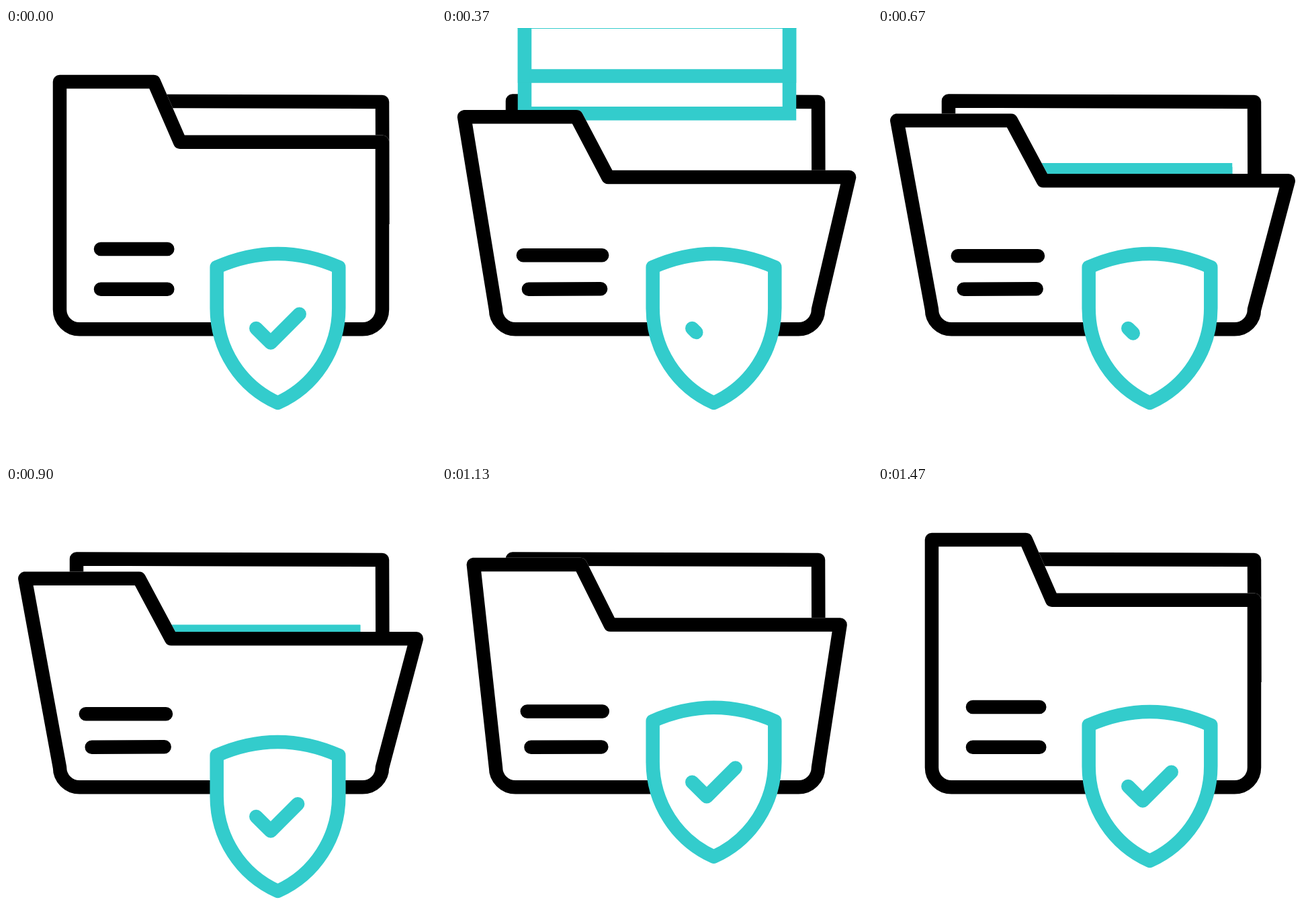
Recreate the animation shown at these times as an HTML page. Size 640 by 640 pixels, loop 1.67 s.

```html
<!DOCTYPE html>
<html lang="en">
<head>
<meta charset="utf-8">
<title>Secure folder</title>
<style>
  html, body { margin: 0; width: 100%; height: 100%; overflow: hidden; background: #fff; }
  svg { display: block; width: 100vw; height: 100vh; }
  path { fill: none; stroke: #000; stroke-width: 20.5; stroke-linejoin: round; }
  .cap { stroke-linecap: round; }
  .teal { stroke: #33cccc; }
  .paper { fill: #fff; }
  .sheet { stroke-linejoin: miter; }
  .mask { fill: #fff; stroke: #fff; }
</style>
</head>
<body>
<svg viewBox="0 0 640 640">
  <path d="M105 200V108.5L560 110L560.6 292"/>
  <path class="sheet teal paper" d="M123 217H517V422H123Z"/>
  <path class="sheet teal paper" d="M123 217H517V422H123Z"/>
  <path class="sheet teal paper" d="M123 217H517V422H123Z"/>
  <path id="mask" class="mask"/>
  <path id="front"/>
  <path id="lines" class="cap"/>
  <g id="shield">
    <path class="teal paper" d="M313.7 356Q404.5 316 495.3 356V417C495.3 478 460 533 404.5 558C349 533 313.7 478 313.7 417Z"/>
    <path id="check" class="teal cap" pathLength="1" d="M372.3 447L394 468.5L436.7 425.7"/>
  </g>
</svg>
<script>
const LOOP = 1670, TICK = 100 / 3;
const $ = id => document.getElementById(id);
const sheets = [...document.querySelectorAll('.sheet')];

const span = (t, a, b) => Math.min(1, Math.max(0, (t - a) / (b - a)));
const smooth = s => s * s * (3 - 2 * s);
const mix = (a, b, k) => a + (b - a) * k;

// Same as cubic-bezier(.167, 0, .667, 1)
function swift(x) {
  let lo = 0, hi = 1;
  for (let i = 0; i < 24; i++) {
    const s = (lo + hi) / 2, r = 1 - s;
    if (0.5 * r * r * s + 2 * r * s * s + s ** 3 < x) lo = s; else hi = s;
  }
  return smooth(lo);
}

// Sheets fall one after another; each lands at its own tick
const FALL = 12.5, DROP = 490, landings = [18.1, 19.1, 20.8];

function shieldY(t) {
  if (t < 30.7) return 51.5 * smooth(span(t, 20, 29));
  if (t < 35.2) return mix(51.5, -18.5, smooth(span(t, 30.7, 35.2)));
  return -18.5 * (1 - smooth(span(t, 35.2, 44)));
}

function draw(t) {
  const k = swift(span(t, 0, 13.8)) - swift(span(t, 29.2, 43.6));
  const p = (x0, y0, x1, y1) => mix(x0, x1, k).toFixed(2) + ' ' + mix(y0, y1, k).toFixed(2);

  const front = `M${p(80, 80, 28.3, 137.7)}L${p(220, 80, 198, 137.7)}` +
    `L${p(259, 169.7, 246, 227.3)}L${p(560, 169.7, 610.8, 227.3)}` +
    'L560 419A29.3 29.3 0 0 1 530.7 448.3H109.3A29.3 29.3 0 0 1 80 419Z';
  $('mask').setAttribute('d', front);
  $('front').setAttribute('d', front);
  $('lines').setAttribute('d',
    `M${p(141, 329, 118.8, 339.2)}L${p(240.3, 329, 238, 339.2)}` +
    `M${p(141, 388.7, 127.7, 388.7)}L${p(240.3, 388.7, 235.7, 388.2)}`);

  sheets.forEach((el, i) => {
    const fall = smooth(span(t, landings[i] - FALL, landings[i]));
    el.setAttribute('transform', `translate(0 ${DROP * (fall - 1)})`);
  });

  const tick = 1 - swift(span(t, 0, 13.8)) + swift(span(t, 18.6, 28.2));
  $('check').style.visibility = tick > 0.001 ? 'visible' : 'hidden';
  $('check').setAttribute('stroke-dasharray', tick > 0.999 ? 'none' : `${tick} 2`);
  $('shield').setAttribute('transform', `translate(0 ${shieldY(t)})`);
}

function play() {
  const ms = performance.now() % LOOP;
  draw(Math.floor((ms + 4) / TICK));
  requestAnimationFrame(play);
}
play();
</script>
</body>
</html>
```
